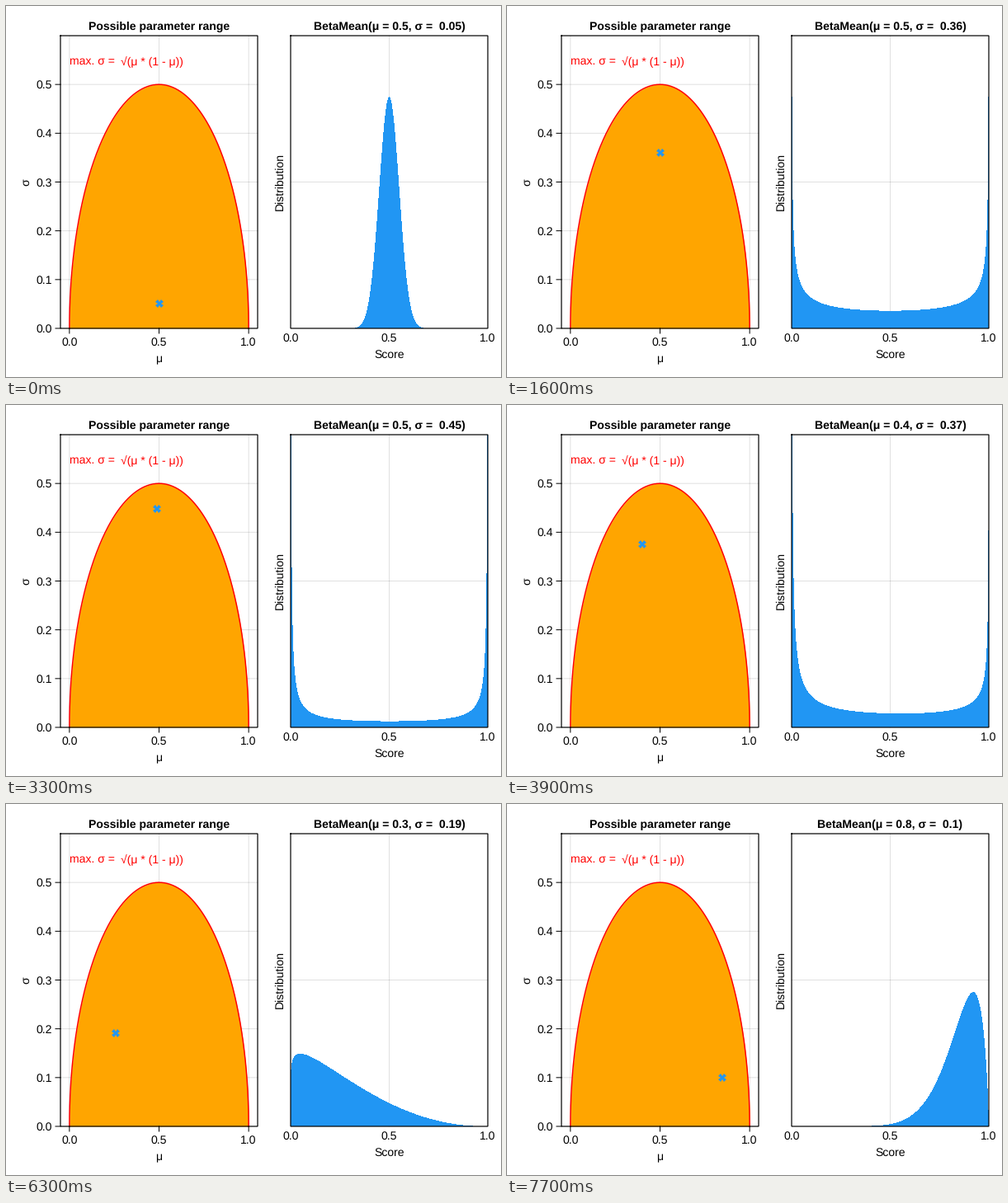
Animation, 600 px wide and 450 px high, one loop 8000 ms. Source, as a matplotlib script:

```python
import math

import matplotlib.pyplot as plt
import numpy as np
from matplotlib.animation import FuncAnimation

W, H, DPI = 600, 450, 100
PX = 72 / DPI  # points per pixel
FRAMES, INTERVAL = 80, 100
TOP, BOTTOM = 36, 391
LEFT_AX, RIGHT_AX = (66, 305), (345, 584)
BLUE = "#2196F3"

# (start frame, duration, (mu, sigma) at start, (mu, sigma) at end)
STAGES = [
    (0, 23.8, (0.5, 0.05), (0.5, 0.46)),
    (29.75, 23.8, (0.5, 0.46), (0.2, 0.2)),
    (59.5, 17.85, (0.2, 0.2), (0.85, 0.1)),
]

plt.rcParams["font.family"] = "Liberation Sans"
plt.rcParams["text.hinting"] = "no_hinting"

fig = plt.figure(figsize=(W / DPI, H / DPI), dpi=DPI, facecolor="white")
ax = fig.add_axes([0, 0, 1, 1])
ax.set_xlim(0, W)
ax.set_ylim(H, 0)
ax.axis("off")


def mu_x(mu):
    left, right = LEFT_AX
    return left + (mu + 0.05) / 1.1 * (right - left)


def sigma_y(sigma):
    return BOTTOM - sigma / 0.6 * (BOTTOM - TOP)


def line(xs, ys, width=1.0, **style):
    style.setdefault("color", "black")
    ax.plot(xs, ys, lw=width * PX, snap=False, **style)


def label(x, y, text, **style):
    style.setdefault("ha", "center")
    return ax.text(x, y, text, fontsize=14 * PX, va="baseline", **style)


def side_label(x, text):
    ax.text(x, (TOP + BOTTOM) / 2, text, fontsize=14 * PX, rotation=90,
            rotation_mode="anchor", ha="center", va="baseline")


def grid(span, xs, ys):
    for x in xs:
        line([x, x], [TOP, BOTTOM], alpha=0.12, zorder=1)
    for y in ys:
        line(span, [y, y], alpha=0.12, zorder=1)


def frame_box(span):
    a, b = span
    line([a, b, b, a, a], [TOP, TOP, BOTTOM, BOTTOM, TOP], 1.2,
         zorder=6, solid_joinstyle="miter")


def draw_parameter_panel():
    x_ticks = [0.0, 0.5, 1.0]
    y_ticks = [0.0, 0.1, 0.2, 0.3, 0.4, 0.5]
    grid(LEFT_AX, [mu_x(v) for v in x_ticks], [sigma_y(v) for v in y_ticks[1:]])
    for v in x_ticks:
        x = mu_x(v)
        line([x, x], [BOTTOM, BOTTOM + 6], zorder=6)
        label(x, 412, f"{v:.1f}")
    for v in y_ticks:
        y = sigma_y(v)
        line([LEFT_AX[0] - 6, LEFT_AX[0]], [y, y], zorder=6)
        label(56, y + 5, f"{v:.1f}", ha="right")

    mu = (1 - np.cos(np.linspace(0, np.pi, 300))) / 2
    xs, ys = mu_x(mu), sigma_y(np.sqrt(mu * (1 - mu)))
    ax.fill_between(xs, ys, BOTTOM, color="orange", lw=0, zorder=2)
    line(xs, ys, 1.5, color="red", zorder=3)
    frame_box(LEFT_AX)

    label(77, 71, "max. σ =", ha="left", color="red")
    label(215, 71, "√(μ * (1 - μ))", ha="right", color="red")
    label(185.5, 29, "Possible parameter range", weight="bold")
    label(185.5, 432, "μ")
    side_label(28, "σ")


def draw_distribution_panel():
    a, b = RIGHT_AX
    mid = (a + b) / 2
    grid(RIGHT_AX, [mid], [(TOP + BOTTOM) / 2])
    for x, text in ((a, "0.0"), (mid, "0.5"), (b, "1.0")):
        label(x, 407, text)
    frame_box(RIGHT_AX)
    label(mid, 427, "Score")
    side_label(336, "Distribution")


draw_parameter_panel()
draw_distribution_panel()

edges = np.arange(RIGHT_AX[0], RIGHT_AX[1] + 1)
scores = (np.arange(len(edges) - 1) + 0.5) / (len(edges) - 1)
bars = ax.stairs(np.full(len(scores), BOTTOM), edges, baseline=BOTTOM,
                 fill=True, color=BLUE, lw=0, zorder=3)
bars.set_antialiased(False)
cross, = ax.plot([], [], "X", ms=10 * PX, color=BLUE, mew=0, snap=False, zorder=5)
title = label(464.5, 29, "", weight="bold")


def parameters(i):
    """Mean and deviation, moved by a sine ease and held between stages."""
    start, span, first, last = [s for s in STAGES if s[0] <= i][-1]
    p = (min(i, math.floor(start + span)) - start) / span
    ease = (1 - math.cos(math.pi * p)) / 2
    return [u + (v - u) * ease for u, v in zip(first, last)]


def beta_pdf(x, mu, sigma):
    n = mu * (1 - mu) / sigma**2 - 1
    a, b = mu * n, (1 - mu) * n
    log_norm = math.lgamma(n) - math.lgamma(a) - math.lgamma(b)
    return np.exp(log_norm + (a - 1) * np.log(x) + (b - 1) * np.log(1 - x))


def update(i):
    mu, sigma = parameters(i)
    density = np.minimum(beta_pdf(scores, mu, sigma), 10)
    bars.set_data(BOTTOM - density / 10 * (BOTTOM - TOP))
    cross.set_data([mu_x(mu)], [sigma_y(sigma)])
    title.set_text(f"BetaMean(μ = {round(mu, 1)}, σ =  {round(sigma, 2)})")
    return bars, cross, title


anim = FuncAnimation(fig, update, frames=FRAMES, interval=INTERVAL, repeat=True)
plt.show()
```
